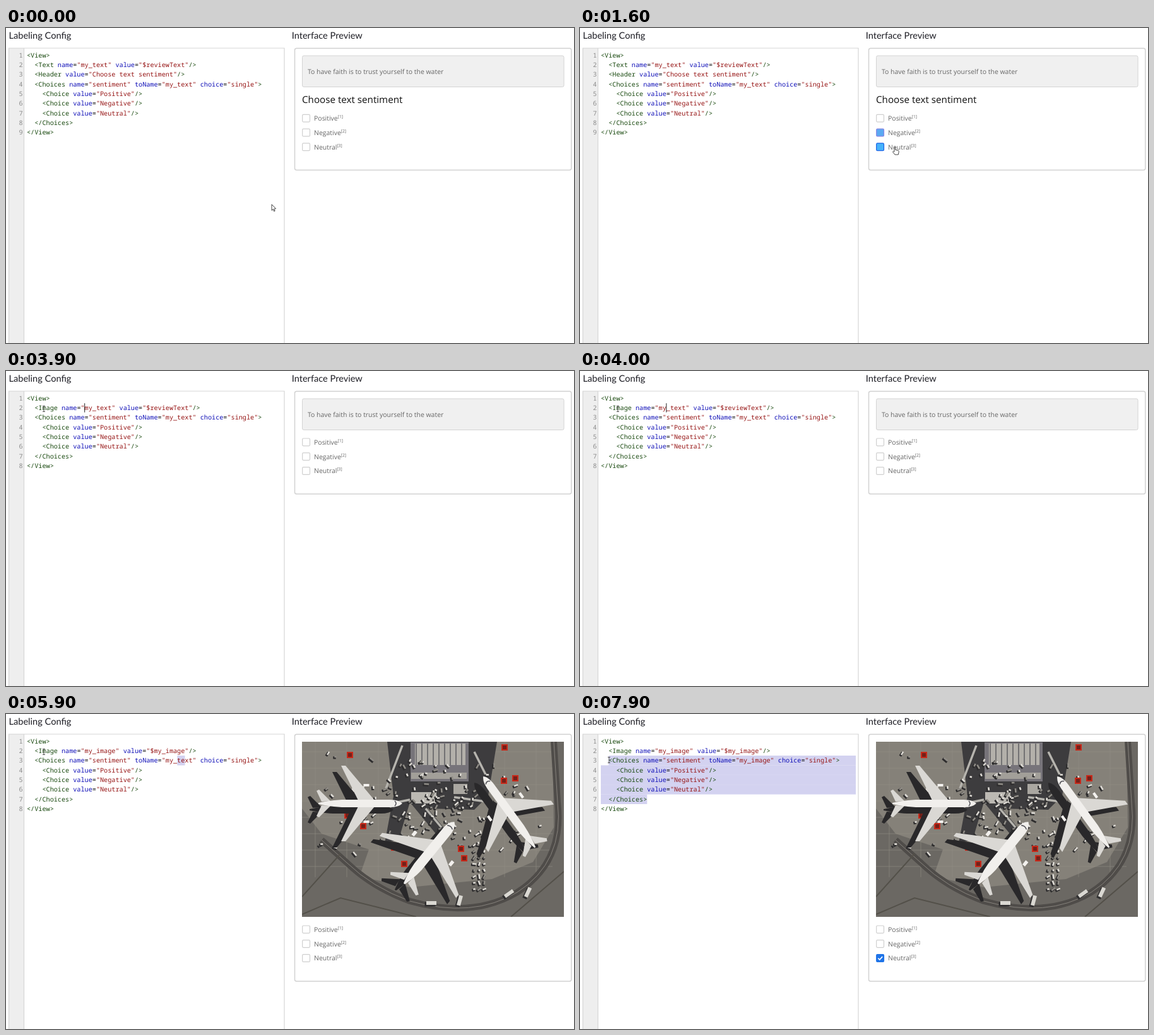
An HTML page for the animation above (8 s loop, 900 by 500 pixels).

```html
<!DOCTYPE html>
<html lang="en">
<head>
<meta charset="utf-8">
<title>Labeling config preview</title>
<style>
  html, body { margin: 0; width: 100%; height: 100%; overflow: hidden; background: #fff; }
  svg { display: block; width: 900px; height: 500px; }
  text { white-space: pre; text-rendering: geometricPrecision; }
  .title { font: 14.6px Lato, sans-serif; fill: #1d1d24; }
  .code { font: 10.18px "Noto Sans Mono", "DejaVu Sans Mono", monospace; }
  .num { fill: #8c8c8c; text-anchor: end; }
  .tag { fill: #1a4a10; }
  .attr { fill: #1010b8; }
  .str { fill: #961414; }
  .body { font: 10.47px "Open Sans", sans-serif; fill: #666; }
  .sup { font-size: 6.7px; }
  .head { font: 500 15.2px "Open Sans", sans-serif; fill: #111; }
</style>
</head>
<body>
<svg viewBox="0 0 900 500">
  <rect width="900" height="500" fill="#fff"/>
  <text class="title" x="4.5" y="16.7">Labeling Config</text>
  <text class="title" x="452.7" y="16.7">Interface Preview</text>
  <rect x="5" y="32" width="24" height="468" fill="#eee"/>
  <path d="M4.5 500V32H441V500M28.5 32V500" fill="none" stroke="#d6d6d6" stroke-width="1.2"/>
  <g id="marks" fill="#d3d2f0"></g>
  <g id="code" class="code"></g>
  <rect id="caret" width="1" height="14.5" fill="#222"/>
  <rect id="panel" x="457.5" y="32.2" width="438.3" rx="3" fill="#fff" stroke="#d2d2d2" stroke-width="1.5"/>
  <g id="quote">
    <rect x="469.5" y="44" width="414.5" height="49.5" rx="2.5" fill="#f0f0f0" stroke="#d4d4d4"/>
    <text class="body" x="478" y="73">To have faith is to trust yourself to the water</text>
  </g>
  <text id="header" class="head" x="469" y="119">Choose text sentiment</text>
  <clipPath id="crop"><rect x="469" y="44" width="415" height="278"/></clipPath>
  <g id="photo" clip-path="url(#crop)"></g>
  <g id="choices"></g>
  <path id="mouse" stroke-linejoin="round"/>
</svg>
<script>
const $ = id => document.getElementById(id);
const show = (id, on) => $(id).setAttribute('visibility', on ? 'visible' : 'hidden');
const clamp = v => Math.max(0, Math.min(1, v));
const LOOP = 8000, STEP = 100;
const X0 = 33, CW = 6.11, Y0 = 35.3, LH = 15.37;
const HEADER_GONE = 2900, PHOTO_SHOWN = 4100;
const OPTIONS = ['Positive', 'Negative', 'Neutral'];

// Each edit selects the part after `keep` letters from `pick`, then types from `type` to `done`.
const edit = (row, key, old, now, keep, pick, type, done) => ({ row, key, old, now, keep, pick, type, done });
const TAG = edit(1, '<', 'Text', 'Image', 0, 3200, 3300, 3600);
const NAME = edit(1, 'name="', 'my_text', 'my_image', 3, 4200, 4400, 4600);
const VALUE = edit(1, 'value="$', 'reviewText', 'my_image', 0, 5000, 5200, 5500);
const TO = edit(2, 'toName="', 'my_text', 'my_image', 3, 5800, 6200, 6500);
const EDITS = [TAG, NAME, VALUE, TO];

const part = (e, word, from, to, t) =>
  e.keep + Math.ceil(clamp((t - from + STEP) / (to - from)) * (word.length - e.keep));
const typed = (e, t) => t < e.type ? e.old : e.now.slice(0, part(e, e.now, e.type, e.done + STEP, t));

function codeLines(t) {
  const header = t < HEADER_GONE ? ['  <Header value="Choose text sentiment"/>'] : [];
  return [
    '<View>',
    `  <${typed(TAG, t)} name="${typed(NAME, t)}" value="$${typed(VALUE, t)}"/>`,
    ...header,
    `  <Choices name="sentiment" toName="${typed(TO, t)}" choice="single">`,
    ...OPTIONS.map(v => `    <Choice value="${v}"/>`),
    '  </Choices>',
    '</View>'
  ];
}

// Mouse stops: leave the previous stop, arrive, x, y
const STOPS = [[0, 0, 421, 280], [100, 600, 499, 143], [800, 1000, 499, 166], [1200, 1400, 499, 189],
  [1800, 2200, 283, 74], [2200, 2500, 46, 73], [2500, 2700, 104, 73], [2800, 3100, 60, 60],
  [6500, 7000, 480, 386], [7200, 7600, 106, 135], [7600, 7900, 46, 73]];

function mouseAt(t) {
  let x = 0, y = 0;
  for (const [leave, arrive, tx, ty] of STOPS) {
    if (t < leave) break;
    const p = arrive > leave ? clamp((t - leave) / (arrive - leave)) : 1, k = p * p * (3 - 2 * p);
    x += (tx - x) * k;
    y += (ty - y) * k;
  }
  return [x, y];
}

// Mouse drags run backwards from an anchor behind the last character.
const DRAGS = [
  { from: 2200, to: 2500, until: HEADER_GONE, row: 2, col: 41 },
  { from: 7600, to: 7900, until: LOOP, row: 6, col: 12 }
];

function selection(t, lines) {
  const d = DRAGS.find(d => t > d.from && t < d.until);
  if (d) {
    const [x, y] = mouseAt(Math.min(t, d.to));
    return [Math.floor((y - Y0) / LH), Math.round((x - X0) / CW), d.row, d.col];
  }
  const e = EDITS.find(e => t >= e.pick && t < e.type);
  if (!e) return null;
  const col = startOf(e, lines);
  return [e.row, col + e.keep, e.row, col + part(e, e.old, e.pick, e.type, t)];
}

const startOf = (e, lines) => lines[e.row].indexOf(e.key) + e.key.length;

// The caret follows the typing, then walks to the next edit.
function caretAt(t, lines) {
  const i = EDITS.findLastIndex(e => t >= e.type);
  if (i < 0 || t > 6900) return null;
  const e = EDITS[i], next = EDITS[i + 1];
  const end = startOf(e, lines) + typed(e, t).length;
  if (t <= e.done || !next) return [e.row, end];
  const goal = startOf(next, lines) + next.keep;
  return [next.row, Math.round(end + (goal - end) * clamp((t - e.done) / (next.pick - 150 - e.done)))];
}

const esc = s => s.replace(/</g, '&lt;').replace(/>/g, '&gt;');
const paint = line => line.replace(/"[^"]*"|\w+(?==)|<\/?\w+|\/?>/g, m => {
  const kind = m[0] === '"' ? 'str' : /^\w/.test(m) ? 'attr' : 'tag';
  return `<tspan class="${kind}">${esc(m)}</tspan>`;
});

function drawCode(t) {
  const lines = codeLines(t);
  $('code').innerHTML = lines.map((line, i) => {
    const y = Y0 + LH * i + 11.2;
    return `<text class="num" x="26.5" y="${y}">${i + 1}</text><text x="${X0}" y="${y}">${paint(line)}</text>`;
  }).join('');

  const sel = selection(t, lines);
  let marks = '';
  if (sel) {
    const [r0, c0, r1, c1] = sel;
    for (let r = r0; r <= r1; r++) {
      const a = r === r0 ? X0 + c0 * CW : X0;
      const b = r === r1 ? X0 + c1 * CW : 437;
      marks += `<rect x="${a}" y="${Y0 + LH * r}" width="${b - a}" height="${LH + .1}"/>`;
    }
  }
  $('marks').innerHTML = marks;

  const caret = !sel && caretAt(t, lines);
  show('caret', caret);
  if (caret) {
    $('caret').setAttribute('x', X0 + caret[1] * CW - .5);
    $('caret').setAttribute('y', Y0 + LH * caret[0] + .5);
  }
}

const CLICKS = [[700, 0], [1100, 1], [1500, 2], [7000, 2]];
const STYLES = {
  empty: ['#fff', '#cfcfcf'], filling: ['#46b2fa', '#1b62e6'],
  checked: ['#1f74e8', '#1f74e8'], clearing: ['#5ba9f2', '#8a86e4']
};

function boxState(i, t) {
  const past = CLICKS.filter(c => c[0] <= t && (t < HEADER_GONE || c[0] > HEADER_GONE));
  const now = past.at(-1), before = past.at(-2);
  const fresh = now && t - now[0] < 2 * STEP;
  if (now && now[1] === i) return fresh ? 'filling' : 'checked';
  return fresh && before && before[1] === i ? 'clearing' : 'empty';
}

function drawPreview(t) {
  const photo = t >= PHOTO_SHOWN, header = t < HEADER_GONE;
  const top = photo ? 342 : header ? 143.3 : 113;
  show('photo', photo);
  show('quote', !photo);
  show('header', header);
  $('panel').setAttribute('height', top + 50);
  $('choices').innerHTML = OPTIONS.map((name, i) => {
    const y = top + i * 22.8, base = Math.round(y + 3.8), state = boxState(i, t);
    const [fill, edge] = STYLES[state];
    const tick = state === 'checked'
      ? `<path d="M472.4 ${y}l2.4 2.5l4.4 -5" fill="none" stroke="#fff" stroke-width="1.6"/>` : '';
    return `<rect x="469.7" y="${y - 6}" width="11.8" height="11.8" rx="1.5" fill="${fill}"
      stroke="${edge}" stroke-width="1.2"/>${tick}<text class="body" x="488" y="${base}">${name}<tspan
      class="sup" dy="-3.9">[${i + 1}]</tspan></text>`;
  }).join('');
  return top;
}

const ARROW = 'M0 0V9.5L2.2 7.6L3.7 11L5.2 10.3L3.7 7.1L6.6 6.8Z';
const HAND = 'M-1 1a1 1 0 0 1 2 0V4.5L5.2 5.4Q6.5 6 6.2 7.6L5.3 12H0L-3.6 7.6Q-3 5.8 -1 7.4Z';
const BEAM = 'M-2 -4.5H2M0 -4.5V4.5M-2 4.5H2';

function drawMouse(t, top) {
  const [x, y] = mouseAt(t);
  const beam = x > 29 && x < 441 && y > 32 && y < 175;
  const hand = x > 468 && x < 535 && y > top - 8 && y < top + 54;
  const m = $('mouse');
  m.setAttribute('d', beam ? BEAM : hand ? HAND : ARROW);
  m.setAttribute('fill', beam ? 'none' : '#fff');
  m.setAttribute('stroke', beam ? '#555' : '#444');
  m.setAttribute('transform', `translate(${x} ${y})`);
}

// Aerial apron made of flat shapes.
function buildPhoto() {
  let seed = 7;
  const rnd = () => (seed = (seed * 16807) % 2147483647) / 2147483647;
  const spread = r => (rnd() + rnd() - 1) * r;
  const path = (d, fill) => `<path d="${d}" fill="${fill}"/>`;
  const line = (d, color, w) => `<path d="${d}" fill="none" stroke="${color}" stroke-width="${w}"/>`;
  const box = (x, y, w, h, fill, turn = 0) =>
    `<rect x="${x - w / 2}" y="${y - h / 2}" width="${w}" height="${h}" fill="${fill}" transform="rotate(${turn} ${x} ${y})"/>`;

  let s = box(676, 183, 416, 280, '#6b6863');
  s += path('M469 44H866L868 180L835 235L770 262L640 275L560 258L575 215L500 190L469 150Z', '#858179');
  for (let i = 0; i < 8; i++) s += line(`M469 ${60 + i * 26}H866M${490 + i * 50} 44v215`, '#918d85', .6);

  // Perimeter road and taxi lines
  const road = 'M500 200L540 236Q580 275 640 297Q740 325 810 283Q885 235 874 140L868 44';
  s += line(road, '#4f4c49', 10) + line(road, '#86827c', 1);
  s += line('M469 290L530 222M469 318L530 292L650 322M800 322L884 250', '#535049', 2);

  // Terminal and jet bridges
  s += path('M604 44H778L764 130L742 152L668 150L700 188L686 196L640 140L622 200L600 205L614 130Z', '#3d3c3e');
  s += box(687, 76, 92, 62, '#77747a') + box(688, 64, 80, 34, '#b3b0aa') + box(686, 98, 88, 10, '#a29f99');
  for (let x = 650; x < 730; x += 9) s += box(x, 64, 1.5, 34, '#5f5d61');
  s += box(662, 133, 40, 18, '#bcb9b3') + box(720, 119, 22, 16, '#aaa7a1');
  s += line('M628 50L602 118M640 136L610 142M710 132L760 139M665 150L690 180M742 60L760 96', '#b6b4ae', 3.5);

  // Ground vehicles and their shade
  const vehicle = (x, y) => {
    const w = 3 + rnd() * 5, turn = rnd() * 180;
    return box(x - 1.5, y + 1.5, w + 1, 4, '#2d2c2d', turn) + box(x, y, w, 2.6, rnd() < .6 ? '#dedbd5' : '#8f8c86', turn);
  };
  for (let i = 0; i < 170; i++) s += vehicle(675 + spread(185), 145 + spread(95));
  for (let i = 0; i < 24; i++) s += vehicle(742 + i % 3 * 8, 208 + Math.floor(i / 3) * 10);
  for (const [x, y, turn] of [[719, 296, 105], [797, 285, -35], [827, 283, 115], [674, 300, 0]]) {
    s += box(x - 2, y + 2, 17, 7, '#302f30', turn) + box(x, y, 16, 6, '#dad8d2', turn);
  }
  for (const [x, y] of [[545, 65], [541, 161], [566, 178], [615, 212], [631, 238], [721, 214],
    [726, 229], [789, 106], [807, 102], [790, 53]]) {
    s += `<rect x="${x - 4}" y="${y - 4}" width="8" height="8" fill="#742019" stroke="#c8291a" stroke-width="2"/>`;
  }

  // One aircraft pointing right; wings are mirrored about its axis.
  const wing = 'M22 -5L-24 -60L-31 -60L-4 -5ZM-48 -4L-66 -22L-70 -20L-62 -3Z';
  const hull = 'M66 0Q60 -6 46 -6H-30Q-50 -5 -67 -1V1Q-50 5 -30 6H46Q60 6 66 0Z';
  const engine = box(9, -29, 9, 4, '#f3f1ee');
  const plane = (a, b, extra) => [1, -1].map(k =>
    `<g transform="scale(1 ${k})">${path(wing, a)}${extra}</g>`).join('') + path(hull, b);
  const fleet = [[562, 142, 0, 1, 1], [671, 220, -51, .95, 1.3], [797, 155, 234, 1.05, 1.07]];
  const place = (dx, dy, body) => fleet.map(([x, y, turn, sx, sy]) =>
    `<g transform="translate(${x + dx} ${y + dy}) rotate(${turn}) scale(${sx} ${sy})">${body}</g>`).join('');
  s += place(-14, 10, plane('#29282a', '#29282a', ''));
  s += place(0, 0, plane('#dad8d4', '#f1efec', engine) + line('M54 -4Q58 0 54 4', '#55555a', 1.6));
  $('photo').innerHTML = s;
}

let last = -1;
function draw(now) {
  const t = Math.floor((now % LOOP) / STEP) * STEP;
  if (t === last) return;
  last = t;
  drawCode(t);
  drawMouse(t, drawPreview(t));
}

buildPhoto();
draw(0);
const start = performance.now();
requestAnimationFrame(function tick() {
  draw(performance.now() - start);
  requestAnimationFrame(tick);
});
</script>
</body>
</html>
```
